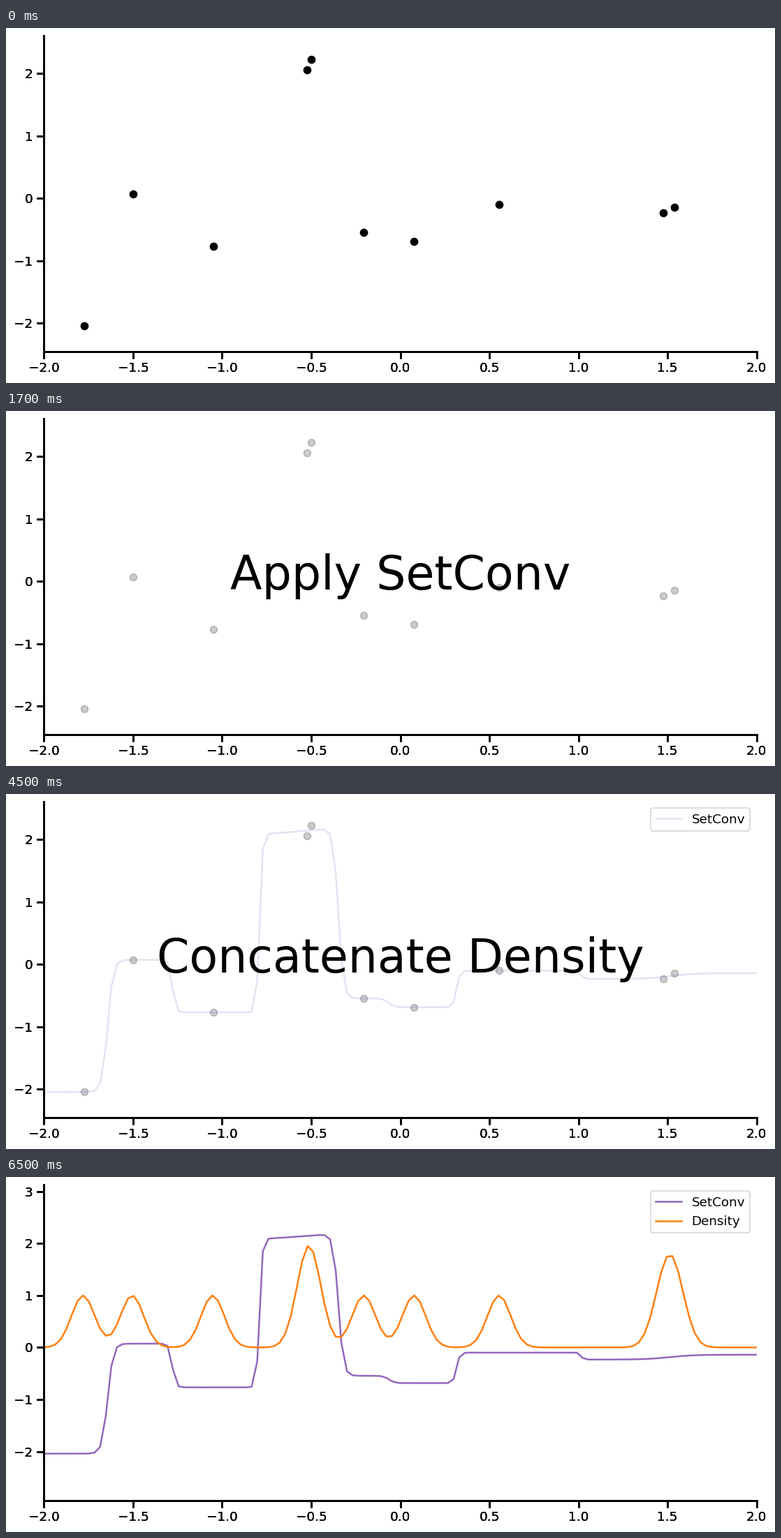
These frames come from a looping animation (1101x509 px, 8 s). A matplotlib script:

```python
import numpy as np
import matplotlib.pyplot as plt
from matplotlib.animation import FuncAnimation

WIDTH, HEIGHT = 1101, 509
INTERVAL = 500
FRAMES = 16

plt.rcParams.update({
    "font.family": "DejaVu Sans",
    "font.size": 12,
    "xtick.labelsize": 11,
    "ytick.labelsize": 11,
    "legend.fontsize": 11,
    "axes.facecolor": "none",
    "legend.facecolor": "white",
    "axes.linewidth": 1.5,
    "axes.spines.top": False,
    "axes.spines.right": False,
    "xtick.major.width": 1.5,
    "ytick.major.width": 1.5,
    "xtick.major.size": 6,
    "ytick.major.size": 6,
    "lines.linewidth": 1.5,
    "lines.markersize": 6,
})

# Context set and its kernel-smoothed representation
x_context = np.array([-1.7755, -1.501, -1.050, -0.524, -0.498,
                      -0.204, 0.077, 0.553, 1.478, 1.539])
y_context = np.array([-2.041, 0.073, -0.767, 2.061, 2.233,
                      -0.545, -0.685, -0.100, -0.233, -0.140])
LENGTH_SCALE = 0.065
Y_LIMITS = np.array([-2.449, 2.604])

# The kernel is sampled slightly inside the plotted range
grid = np.linspace(-2, 2, 128)
samples = 0.997 * grid
weights = np.exp(-0.5 * ((samples[:, None] - x_context) / LENGTH_SCALE) ** 2)
density = weights.sum(axis=1)
set_conv = weights @ y_context / density

fig = plt.figure(figsize=(9.175, 4.2417), dpi=120, facecolor="white")

# Stacked identical axes give the frame and tick labels their heavy look
BOX = [54.45 / WIDTH, 45.4 / HEIGHT, 1020.1 / WIDTH, 452.3 / HEIGHT]
layers = [fig.add_axes(BOX, label=f"layer {i}") for i in range(3)]
ax = layers[-1]


def draw_points(alpha=1):
    ax.scatter(x_context, y_context, color="black", alpha=alpha)


def draw_set_conv(alpha=1):
    ax.plot(grid, set_conv, color="tab:purple", alpha=alpha, label="SetConv")


def draw_title(text):
    ax.text(0.5, 0.5, text, transform=ax.transAxes, fontsize=40,
            ha="center", va="center")


def show_context():
    draw_points()


def announce_set_conv():
    draw_points(0.2)
    draw_title("Apply SetConv")


def show_set_conv():
    draw_points()
    draw_set_conv()


def announce_density():
    draw_points(0.2)
    draw_set_conv(0.2)
    draw_title("Concatenate Density")


def show_density():
    draw_set_conv()
    ax.plot(grid, density, color="tab:orange", label="Density")


# Start time in ms, drawing function and vertical zoom of each scene
SCENES = [
    (0, show_context, 1),
    (500, announce_set_conv, 1),
    (2500, show_set_conv, 1),
    (4500, announce_density, 1),
    (6500, show_density, 1.2),
]


def update(frame):
    time = frame * INTERVAL
    _, draw_scene, zoom = [s for s in SCENES if s[0] <= time][-1]
    for layer in layers:
        layer.clear()
    draw_scene()
    for layer in layers:
        layer.set_xlim(-2, 2)
        layer.set_ylim(*(zoom * Y_LIMITS))
    if ax.get_legend_handles_labels()[0]:
        ax.legend(loc="upper right")
    return []


animation = FuncAnimation(fig, update, frames=FRAMES, init_func=lambda: [],
                          interval=INTERVAL, repeat=True, repeat_delay=0)
plt.show()
```
